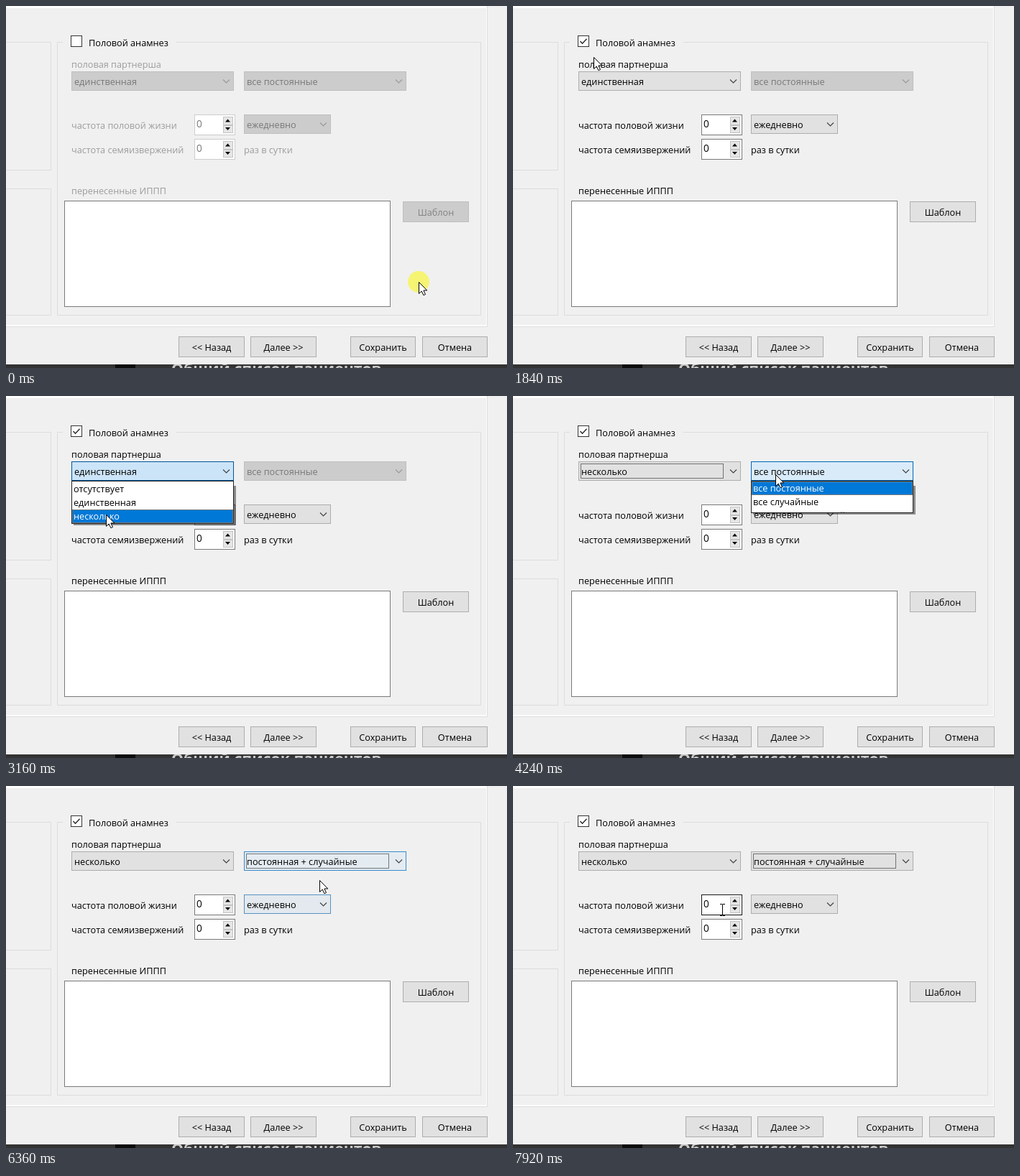
Animation, 697 px wide and 504 px high, one loop 8000 ms. Source, as an HTML page:

```html
<!DOCTYPE html>
<html lang="ru">
<head>
<meta charset="utf-8">
<style>
html, body { margin: 0; width: 100%; height: 100%; overflow: hidden; background: #f0f0f0; }
svg { display: block; }
#stage { width: 697px; height: 504px; font: 12.7px "Open Sans", "Noto Sans", sans-serif; }
text { white-space: pre; }
</style>
</head>
<body>
<svg id="stage" viewBox="0 0 697 504"></svg>
<script>
const LOOP = 8000, STEP = 40, FADE_STEPS = 6, ROW = 19, LIST_H = 60;
const stage = document.getElementById('stage');

// Pointer moves: start time, end time, x, y. It rests in between.
const home = [574, 384];
const moves = [
  [520, 1080, 90, 14], [1080, 1200, 91, 40], [1200, 1400, 100, 53], [1600, 2200, 134, 105],
  [2700, 3160, 139, 165], [3560, 4120, 365, 109], [5260, 5520, 372, 138], [6060, 6180, 378, 161],
  [6220, 6360, 436, 131], [6360, 6880, 287, 195], [6920, 7320, 372, 166], [7400, 7720, 290, 196],
  [7760, 7920, 291, 172]
];
const clicks = [0, 1440, 2280, 3440, 4160, 6200];
const CLICK = 80, ENABLED = 1520;
const first = { x: 91, y: 91, w: 226, open: 2240, close: 3520, shift: 0,
  items: ['отсутствует', 'единственная', 'несколько'] };
const second = { x: 331, y: 91, w: 226, open: 4120, close: 6240, shift: -1,
  items: ['все постоянные', 'все случайные', 'постоянная + случайные'] };
const third = { x: 331, y: 151, w: 121 };

const during = (t, a, b) => t >= a && t < b;
const clamp = u => Math.min(1, Math.max(0, u));
const ease = u => u * u * (3 - 2 * u);

function pointer(t) {
  let [x, y] = home;
  for (const [from, until, toX, toY] of moves) {
    const u = ease(clamp((t - from) / (until - from)));
    x += (toX - x) * u;
    y += (toY - y) * u;
  }
  return [Math.round(x), Math.round(y)];
}

function over([x, y], { x: bx, y: by, w, h = 27 }) {
  return x >= bx && x < bx + w && y >= by && y < by + h;
}

const isOpen = (t, c) => t > c.open && t < c.close;

// 0 idle, 1 hover, 2 open; averaged over the recent past to fade.
function glow(t, c) {
  let sum = 0;
  for (let i = 0; i < FADE_STEPS; i++) {
    const past = t - i * STEP;
    sum += isOpen(past, c) ? 2 : over(pointer(past), c) ? 1 : 0;
  }
  return sum / FADE_STEPS;
}

function shade(level, colors) {
  const i = Math.min(Math.floor(level), colors.length - 2), u = level - i;
  return `rgb(${colors[i].map((c, k) => Math.round(c + (colors[i + 1][k] - c) * u))})`;
}
const face = v => shade(v, [[225, 225, 225], [229, 241, 251], [204, 228, 247]]);
const edge = v => shade(v, [[173, 173, 173], [0, 120, 215], [0, 84, 153]]);

const rect = (x, y, w, h, fill, more = '') =>
  `<rect x="${x}" y="${y}" width="${w}" height="${h}" fill="${fill}" ${more}/>`;
const box = (x, y, w, h, fill, stroke, more = '') =>
  rect(x + .5, y + .5, w - 1, h - 1, fill, `stroke="${stroke}" ${more}`);
const line = (d, stroke, width = 1) =>
  `<path d="${d}" fill="none" stroke="${stroke}" stroke-width="${width}"/>`;
const text = (x, y, s, fill = '#000', more = '') =>
  `<text x="${x}" y="${y}" fill="${fill}" ${more}>${s.replace(/</g, '&lt;')}</text>`;
const dotted = (x, y, w, h, color) => box(x, y, w, h, 'none', color, 'stroke-dasharray="1 1"');

function button(x, y, w, label, on = true) {
  return box(x, y, w, 29, on ? '#e1e1e1' : '#ccc', on ? '#adadad' : '#bfbfbf')
    + text(x + w / 2, y + 20, label, on ? '#000' : '#838383', 'text-anchor="middle"');
}

function combo(t, c, label, on, focus) {
  const { x, y, w } = c, ax = x + w - 15, level = on ? glow(t, c) : 0;
  return box(x, y, w, 27, on ? face(level) : '#ccc', on ? edge(level) : '#bfbfbf')
    + text(x + 4, y + 19, label, on ? '#000' : '#787878')
    + line(`M${ax} ${y + 11.5}l4.5 4.5 4.5-4.5`, on ? '#404040' : '#999', 1.1)
    + (focus ? dotted(x + 3, y + 3, w - 27, 21, '#000') : '');
}

function spinner(y, on, hover) {
  const arrow = (cy, s) => `<path d="M305 ${cy + 2 * s}h7l-3.5 ${-4 * s}z"/>`;
  return box(262, y, 57, 29, '#fff', !on ? '#ccc' : hover ? '#171717' : '#7a7a7a')
    + text(265, y + 18, '0', on ? '#000' : '#787878', 'font-size="13.6"')
    + box(302, y + 3, 14, 12, '#e6e6e6', '#c4c4c4') + box(302, y + 15, 14, 11, '#e6e6e6', '#c4c4c4')
    + arrow(y + 8.5, 1) + arrow(y + 20, -1);
}

// Drop-down list unrolling below its combo box; `slides` moves the rows along.
function popup(t, c, picked, slides) {
  if (!isOpen(t, c)) return '';
  const h = Math.round(LIST_H * clamp((t - c.open) / 160)) , top = c.y + 27;
  const rows = c.items.map((s, i) => {
    const y = 2 + ROW * i, hot = i === picked;
    return (hot ? rect(1, y, c.w - 2, ROW, '#0078d7') + dotted(1, y, c.w - 2, ROW, '#e8842a') : '')
      + text(3, y + 14, s, hot ? '#fff' : '#000');
  }).join('');
  const shift = c.shift + (slides ? h - LIST_H : 0);
  return rect(c.x + 3, top + 7, c.w, Math.max(0, h - 5), '#000', 'opacity=".42"')
    + `<svg x="${c.x}" y="${top}" width="${c.w}" height="${h}">${rect(0, 0, c.w, h, '#fff')}`
    + `<g transform="translate(0 ${shift})">${rows}</g>${box(0, 0, c.w, h, 'none', '#222')}</svg>`;
}

// The row under the pointer, or the chosen one while it is still above the list.
function pickedRow(y, c, chosen) {
  const row = Math.floor((y - c.y - 29 - c.shift) / ROW);
  return row < 0 ? chosen : Math.min(row, c.items.length - 1);
}

function cursor(x, y, beam) {
  if (beam) {
    return line(`M${x - 3} ${y - 7.5}h3l.5 1 .5-1h3M${x + .5} ${y - 7}v15M${x - 3} ${y + 8.5}h3l.5-1 .5 1h3`, '#000');
  }
  return `<path transform="translate(${x + .5} ${y + .5})" fill="#fff" stroke="#000"
    d="M0 0V16L3.7 12.5 6.4 18.2 9 17 6.4 11.5H11.3Z"/>`;
}

const frame = rect(0, 0, 697, 504, '#f0f0f0')
  + rect(0, 0, 669, 3, '#fff') + rect(668, 0, 1, 446, '#fff') + rect(0, 444, 669, 2, '#fff')
  + line('M669.5 0V446.5H0', '#dcdcdc')
  + line('M0 50.5H62.5V228.5H0M0 254.5H62.5V430.5H0M79 50.5H71.5V430.5H660.5V50.5H237', '#dcdcdc')
  + box(81, 271, 454, 148, '#fff', '#7a7a7a')
  + button(240, 460, 92, '<< Назад') + button(340, 460, 92, 'Далее >>')
  + button(479, 460, 91, 'Сохранить') + button(579, 460, 91, 'Отмена')
  + `<svg y="499" width="697" height="5">${rect(0, 0, 697, 5, '#333')}${rect(152, 0, 28, 5, '#0c0c0c')}
    ${text(230, 14, 'Общий список пациентов', '#c8c8c8', 'font-size="21.3" font-weight="700"')}</svg>`;

function draw(t) {
  const at = pointer(t), [x, y] = at;
  const on = t >= ENABLED, several = t >= first.close, mixed = t >= second.close;
  const ink = on ? '#000' : '#9c9c9c';
  const [over1, over2] = [151, 185].map(top => over(at, { x: 262, y: top, w: 57, h: 29 }));

  let s = frame
    + box(90, 41, 16, 16, '#fff', '#333')
    + (on ? line('M93.5 49l3 3.3 6-6.6', '#222', 1.3) : '')
    + text(115, 56, 'Половой анамнез')
    + text(91, 86, 'половая партнерша', ink)
    + text(91, 171, 'частота половой жизни', ink)
    + text(91, 205, 'частота семяизвержений', ink)
    + text(331, 205, 'раз в сутки', ink)
    + text(91, 262, 'перенесенные ИППП', ink)
    + button(552, 272, 92, 'Шаблон', on)
    + combo(t, first, first.items[several ? 2 : 1], on, during(t, first.close, 4280))
    + combo(t, second, second.items[mixed ? 2 : 0], several, mixed)
    + combo(t, third, 'ежедневно', on, false)
    + spinner(151, on, over1) + spinner(185, on, over2)
    + popup(t, first, pickedRow(y, first, 1), true)
    + popup(t, second, pickedRow(y, second, 0), false);

  if (clicks.some(c => during(t, c, c + CLICK))) {
    s += `<circle cx="${x}" cy="${y}" r="15" fill="#fbf800" opacity=".52"/>`;
  }
  stage.innerHTML = s + cursor(x, y, (over1 || over2) && x < 301);
}

let last = -1;
const start = performance.now();
function tick(now) {
  const t = Math.floor(Math.max(0, now - start) % LOOP / STEP) * STEP;
  if (t !== last) draw(last = t);
  requestAnimationFrame(tick);
}
tick(start);
</script>
</body>
</html>
```
